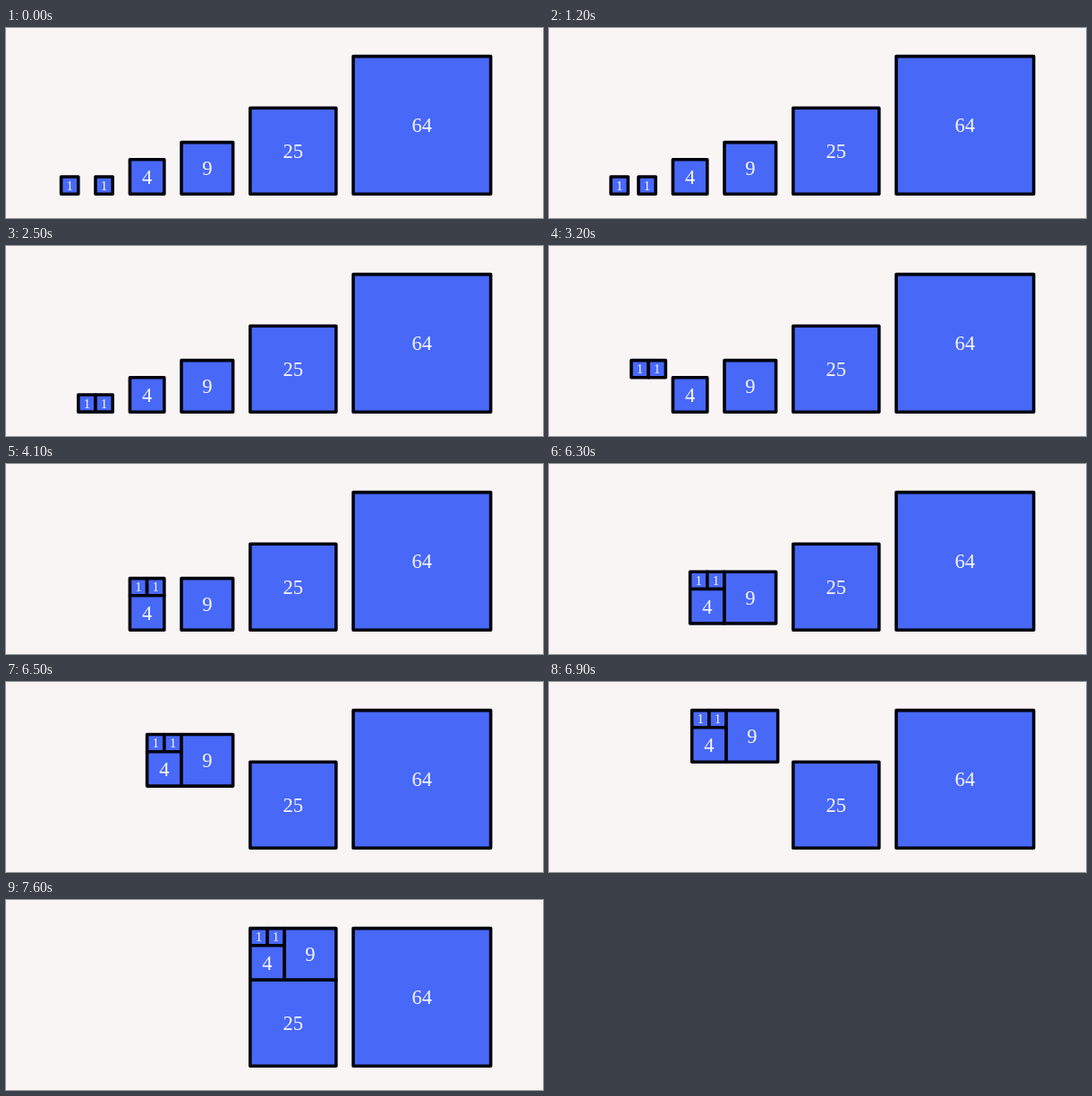
These frames come from a looping animation (600x212 px, 8000 ms). An HTML page:

```html
<!DOCTYPE html>
<html lang="en">
<head>
<meta charset="utf-8">
<title>Fibonacci squares</title>
<style>
  html, body { margin: 0; height: 100%; overflow: hidden; background: #f9f5f4; }
  svg { display: block; }
  rect { fill: #4868f8; stroke: #03030c; stroke-width: 3.6; stroke-linejoin: round; }
  text { fill: #f8f8ff; text-anchor: middle; font-family: "Liberation Serif", serif; }
</style>
</head>
<body>
<svg id="stage" width="600" height="212" viewBox="0 0 600 212"></svg>
<script>
const UNIT = 19.2, LEFT = 61.6, FLOOR = 185.2;
const LOOP = 8000, MOVE_TIME = 500;

// [column, side] in units
const squares = [[0, 1], [2, 1], [4, 2], [7, 3], [11, 5], [17, 8]];

// Each move shifts the first `count` squares by (dx, dy) units.
const moves = [
  { start: 980, count: 1, dx: 1, dy: 0 },
  { start: 2480, count: 2, dx: 0, dy: -2 },
  { start: 3040, count: 2, dx: 3, dy: 0 },
  { start: 4690, count: 3, dx: 1, dy: 0 },
  { start: 6190, count: 4, dx: 0, dy: -5 },
  { start: 6836, count: 4, dx: 6, dy: 0 },
];

const stage = document.getElementById("stage");

function add(parent, tag, attributes = {}) {
  const node = document.createElementNS("http://www.w3.org/2000/svg", tag);
  for (const name in attributes) node.setAttribute(name, attributes[name]);
  return parent.appendChild(node);
}

const groups = squares.map(([column, side]) => {
  const group = add(stage, "g");
  const size = side * UNIT, fontSize = side === 1 ? 15 : 22.5;
  const x = LEFT + column * UNIT, y = FLOOR - size;
  add(group, "rect", { x, y, width: size, height: size });
  add(group, "text", {
    x: x + size / 2, y: y + size / 2 + fontSize * 0.35, "font-size": fontSize,
  }).textContent = side * side;
  return group;
});

function smooth(t) {
  const u = Math.min(1, Math.max(0, t)), v = 1 - u;
  return u ** 3 * (10 * v * v + 5 * u * v + u * u);
}

function draw(now) {
  const time = now % LOOP;
  groups.forEach((group, i) => {
    let x = 0, y = 0;
    for (const { start, count, dx, dy } of moves) {
      if (i >= count) continue;
      const progress = smooth((time - start) / MOVE_TIME);
      x += dx * progress;
      y += dy * progress;
    }
    group.setAttribute("transform", `translate(${x * UNIT} ${y * UNIT})`);
  });
  requestAnimationFrame(draw);
}
requestAnimationFrame(draw);
</script>
</body>
</html>
```
